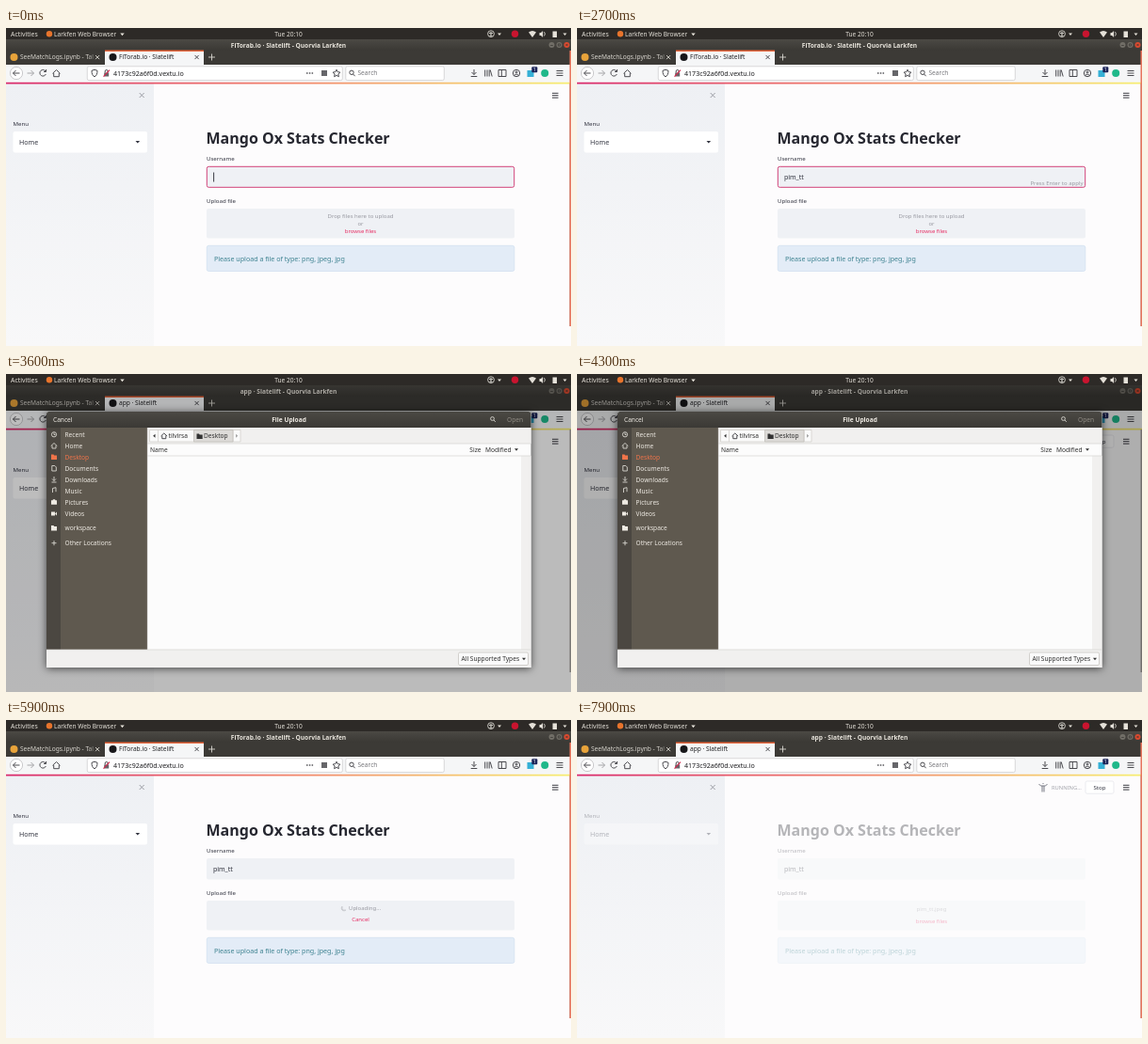
Recreate the animation shown at these times as an HTML page. Size 600 by 338 pixels, loop 8000 ms.

```html
<!DOCTYPE html>
<html lang="en">
<head>
<meta charset="utf-8">
<title>Stats checker upload</title>
<style>
html, body { margin: 0; width: 100%; height: 100%; overflow: hidden; background: #fdfcfd; }
svg { display: block; width: 600px; height: 338px; }
text { font: 6.6px "Noto Sans", "Open Sans", sans-serif; white-space: pre; }
.mid { text-anchor: middle; }
.end { text-anchor: end; }
.bold { font-weight: 700; }
.body { font-size: 7.1px; fill: #31333f; }
.small { font-size: 6.1px; fill: #31333f; }
.hint { font-size: 6px; fill: #9899a1; }
.link { font-size: 6px; fill: #e62c62; }
.line { fill: none; stroke: #4a4a4f; stroke-width: 1; }
.pale { fill: none; stroke: #d9d6d0; stroke-width: .9; }

/* 1% of the loop is 80 ms */
.step, .ease { animation: 8s step-end infinite; }
.ease { animation-timing-function: linear; }
.home { animation-name: home; }
.app { animation-name: app; }
.focus { animation-name: focus; }
.press { animation-name: press; }
.caret { animation-name: caret; }
.hover { animation-name: hover; }
.drop { animation-name: drop; }
.sending { animation-name: sending; }
.sent { animation-name: sent; }
.edge { animation-name: edge; }
.status { animation-name: status; }
.stale { animation-name: stale; }
.dim { animation-name: dim; }
.dialog { animation-name: dialog; transform-origin: 300px 176px; }
.shadow { filter: drop-shadow(0 1px 4px rgba(0, 0, 0, .65)); }
.c1 { animation-name: c1; } .c2 { animation-name: c2; } .c3 { animation-name: c3; }
.c4 { animation-name: c4; } .c5 { animation-name: c5; } .c6 { animation-name: c6; }
.spin { animation: spin .8s linear infinite; transform-origin: 359px 200px; }
.run, .wheel, .stand { animation: 1.6s step-end infinite; }
.run { animation-name: run; }
.wheel { animation-name: wheel; }
.stand { animation-name: stand; }

@keyframes home { 0% { opacity: 1 } 45% { opacity: 0 } 60% { opacity: 1 } 80%, to { opacity: 0 } }
@keyframes app { 0% { opacity: 0 } 45% { opacity: 1 } 60% { opacity: 0 } 80%, to { opacity: 1 } }
@keyframes focus { 0% { opacity: 1 } 39.8%, to { opacity: 0 } }
@keyframes press { 0% { opacity: 0 } 4.8% { opacity: 1 } 39.8%, to { opacity: 0 } }
@keyframes hover { 0% { opacity: 0 } 37.3% { opacity: 1 } 62.2%, to { opacity: 0 } }
@keyframes drop { 0% { opacity: 1 } 62.2%, to { opacity: 0 } }
@keyframes sending { 0% { opacity: 0 } 62.2% { opacity: 1 } 78.6%, to { opacity: 0 } }
@keyframes sent { 0% { opacity: 0 } 78.6%, to { opacity: 1 } }
@keyframes edge { 0% { opacity: 1 } 41.2% { opacity: 0 } 62.2%, to { opacity: 1 } }
@keyframes c1 { 0% { opacity: 0 } 4.8%, to { opacity: 1 } }
@keyframes c2 { 0% { opacity: 0 } 8.6%, to { opacity: 1 } }
@keyframes c3 { 0% { opacity: 0 } 12.3%, to { opacity: 1 } }
@keyframes c4 { 0% { opacity: 0 } 19.8%, to { opacity: 1 } }
@keyframes c5 { 0% { opacity: 0 } 23.6%, to { opacity: 1 } }
@keyframes c6 { 0% { opacity: 0 } 26%, to { opacity: 1 } }
@keyframes caret {
  0% { transform: none; opacity: 1 }
  4.8% { transform: translateX(4.3px) }
  8.6% { transform: translateX(6.1px) }
  12.3% { transform: translateX(12.6px) }
  19.8% { transform: translateX(15.7px) }
  23.6% { transform: translateX(18.2px) }
  26% { transform: translateX(20.7px); opacity: 1 }
  32.3% { transform: translateX(20.7px); opacity: 0 }
  38.5% { transform: translateX(20.7px); opacity: 1 }
  39.8%, to { transform: translateX(20.7px); opacity: 0 }
}
@keyframes dialog {
  0%, 41.42% { transform: scaleY(0); opacity: 0; animation-timing-function: cubic-bezier(.25, .46, .45, .94) }
  44.55%, 62.1% { transform: none; opacity: 1 }
  62.2%, to { transform: none; opacity: 0 }
}
@keyframes dim { 0%, 42.5% { opacity: 0 } 45.5%, 62.1% { opacity: 1 } 62.2%, to { opacity: 0 } }
@keyframes status {
  0%, 46% { opacity: 0 } 48.5%, 59.9% { opacity: 1 }
  60%, 81% { opacity: 0 } 83.5%, to { opacity: 1 }
}
@keyframes stale { 0%, 86.25% { opacity: 1; animation-timing-function: ease-in } 98.7%, to { opacity: .33 } }
@keyframes spin { to { transform: rotate(1turn) } }
@keyframes run { 0%, 50% { opacity: 1 } 25%, 75%, to { opacity: 0 } }
@keyframes wheel { 0% { opacity: 0 } 25% { opacity: 1 } 50%, to { opacity: 0 } }
@keyframes stand { 0% { opacity: 0 } 75%, to { opacity: 1 } }
</style>
</head>
<body>
<svg viewBox="0 0 600 338">
  <defs>
    <linearGradient id="rainbow"><stop stop-color="#d9286a"/><stop offset=".5" stop-color="#f2836a"/><stop offset="1" stop-color="#f6ee70"/></linearGradient>
    <linearGradient id="side" x2="0" y2="1"><stop stop-color="#eef0f4"/><stop offset="1" stop-color="#f8f8f9"/></linearGradient>
    <linearGradient id="bar" x2="0" y2="1"><stop stop-color="#4b4944"/><stop offset="1" stop-color="#3b3935"/></linearGradient>
    <linearGradient id="tabfade"><stop stop-color="#3c3a36" stop-opacity="0"/><stop offset="1" stop-color="#3c3a36"/></linearGradient>
    <clipPath id="tab"><path d="M0 23H100V39H0z"/></clipPath>
  </defs>

  <!-- page -->
  <path fill="#fdfcfd" d="M0 57H600V338H0z"/>
  <path fill="url(#side)" d="M0 58H157V338H0z"/>
  <path fill="url(#rainbow)" d="M0 57.5H600V59.5H0z"/>
  <path class="line" style="stroke:#9b9ca3" d="M141.7 69l5 5m0-5l-5 5"/>

  <g class="ease stale">
    <text class="small" x="7.5" y="104">Menu</text>
    <rect x="7.5" y="110" width="142.5" height="22.5" rx="2" fill="#fff"/>
    <text class="body" x="14" y="123.8">Home</text>
    <path fill="#31333f" d="M137.5 120h4.6l-2.3 2.6z"/>

    <text class="bold" x="212.5" y="122.5" style="font-size:16px;fill:#262730">Mango Ox Stats Checker</text>
    <text class="small" x="213" y="141">Username</text>
    <rect x="213" y="147" width="327" height="22.5" rx="2" fill="#eff1f5"/>
    <rect class="step focus" x="213.3" y="147.3" width="326.4" height="22" rx="2" fill="none" stroke="#d3447a"/>
    <g class="body">
      <text class="body step c1" x="220" y="160.8">p</text>
      <text class="body step c2" x="224.3" y="160.8">i</text>
      <text class="body step c3" x="226.1" y="160.8">m</text>
      <text class="body step c4" x="232.6" y="160.8">_</text>
      <text class="body step c5" x="235.7" y="160.8">t</text>
      <text class="body step c6" x="238.2" y="160.8">t</text>
    </g>
    <path class="step caret" fill="#262730" d="M220.2 153.5h.9v10h-.9z"/>
    <text class="hint end step press" x="537.5" y="167">Press Enter to apply</text>

    <text class="small" x="213" y="186.2">Upload file</text>
    <rect x="213" y="192" width="327" height="31.5" rx="2" fill="#eff1f5"/>
    <g class="step drop">
      <text class="hint mid" x="376.5" y="202.4">Drop files here to upload</text>
      <text class="hint mid" x="376.5" y="210">or</text>
      <text class="link mid" x="376.5" y="217.6">browse files</text>
      <path class="step hover" stroke="#e62c62" stroke-width=".6" d="M360 218.7h33"/>
    </g>
    <g class="step sending">
      <path class="spin" fill="none" stroke="#a0a1a8" stroke-width=".8" d="M359 197.5a2.5 2.5 0 0 1 0 5"/>
      <text class="hint" x="364" y="202.4">Uploading...</text>
      <text class="link mid" x="376.5" y="213.8">Cancel</text>
    </g>
    <g class="step sent">
      <text class="hint mid" x="376.5" y="203.2">pim_tt.jpeg</text>
      <text class="link mid" x="376.5" y="215.6">browse files</text>
    </g>
    <rect x="213.3" y="231.3" width="326.5" height="27.2" rx="2" fill="#e3ecf7" stroke="#cfdff0" stroke-width=".7"/>
    <text class="body" x="221" y="247.6" style="fill:#3d8290">Please upload a file of type: png, jpeg, jpg</text>
  </g>

  <g class="ease status">
    <g fill="none" stroke="#777983">
      <path class="run" d="M495.5 68v.8M495 70l-1 3 2.5 1.5V77M494 73l-3 3M491 71.5l4-1.5 3 2.5"/>
      <path class="wheel" d="M494 67v1M494 69v4h3l1.5 3M494 70.5h3M492.5 71.5a2.6 2.6 0 1 0 4 3.4"/>
      <path class="stand" d="M495 67v1M490.5 68l2 2h5l2-2M494 70v6.5M496 70v6.5"/>
    </g>
    <text x="504" y="74.3" style="font-size:5.8px;fill:#a3a4ab">RUNNING...</text>
    <rect x="540" y="65" width="30" height="13.2" rx="1.8" fill="#fff" stroke="#e2e3e8" stroke-width=".7"/>
    <text class="small mid" x="555" y="73.8">Stop</text>
  </g>
  <path class="line" style="stroke:#3a3b42" d="M580 69.3h6.5m-6.5 2.4h6.5m-6.5 2.4h6.5"/>

  <!-- window frame and tabs -->
  <path fill="#3c3a36" d="M0 12H600V39H0z"/>
  <path fill="url(#bar)" d="M0 12H600V23.5H0z"/>
  <g fill="#e6e2da">
    <text class="mid bold step home" x="300" y="20.6">FiTorab.io · Slatelift - Quorvia Larkfen</text>
    <text class="mid bold step app" x="300" y="20.6">app · Slatelift - Quorvia Larkfen</text>
  </g>
  <g fill="#716e67"><circle cx="579.5" cy="18" r="3"/><circle cx="587.5" cy="18" r="3"/></g>
  <circle cx="595.5" cy="18" r="3" fill="#dc4a30"/>
  <path stroke="#33312d" stroke-width=".7" fill="none" d="M578.2 18.5h2.6M586.4 16.9h2.2v2.2h-2.2zM594.4 16.9l2.2 2.2m0-2.2l-2.2 2.2"/>
  <circle cx="8.5" cy="31" r="4" fill="#e8a33a"/>
  <g clip-path="url(#tab)">
    <text x="15" y="33.4" fill="#d8d5ce">SeeMatchLogs.ipynb - Tal</text>
    <path fill="url(#tabfade)" d="M86 25h14v14H86z"/>
  </g>
  <path class="pale" d="M95 29l4.2 4.2m0-4.2L95 33.2"/>
  <path fill="#f5f6f7" d="M105 24H210V39H105z"/>
  <path fill="#e8663c" d="M105 23.4H210V25H105z"/>
  <circle cx="113.5" cy="31" r="4" fill="#17171a"/>
  <g fill="#1f1f22">
    <text class="step home" x="120" y="33.4">FiTorab.io · Slatelift</text>
    <text class="step app" x="120" y="33.4">app · Slatelift</text>
  </g>
  <path class="line" d="M200.5 28.9l4.2 4.2m0-4.2l-4.2 4.2"/>
  <path class="pale" d="M215 31h7m-3.5-3.5v7"/>

  <!-- toolbar -->
  <path fill="#f5f6f7" d="M0 39H600V57.5H0z"/>
  <circle cx="11" cy="48" r="6.6" fill="#fff" stroke="#b5b5b8" stroke-width=".7"/>
  <g class="line">
    <path d="M14.5 48h-7m3-3l-3 3 3 3"/>
    <path stroke="#a5a5a8" d="M22.5 48h7m-3-3l3 3-3 3"/>
    <path d="M42 46a3.3 3.3 0 1 0 .3 3M42.6 44v2.5h-2.5"/>
    <path d="M49.5 48.3l4-3.8 4 3.8M50.7 48v3.7h5.6V48"/>
  </g>
  <g fill="#fff" stroke="#c9c9cc" stroke-width=".7">
    <rect x="86.3" y="40.8" width="271" height="14.8" rx="1.8"/>
    <rect x="360.8" y="40.8" width="104.5" height="14.8" rx="1.8"/>
  </g>
  <path class="line" d="M94 44.3l3 1c0 3.5-1 5.5-3 6.5-2-1-3-3-3-6.5z"/>
  <path fill="#66666a" d="M104.2 47.5h5v4h-5z"/>
  <path class="line" d="M105.2 47.5v-1.5a1.5 1.5 0 0 1 3 0v1.5"/>
  <path stroke="#d7264c" stroke-width="1.1" d="M103.5 51.7l6.5-7"/>
  <text x="114" y="50.5" fill="#1a1a1d" style="font-size:7.1px">4173c92a6f0d.vextu.io</text>
  <path stroke="#55555a" stroke-width="1.5" stroke-dasharray="1.5 1.3" d="M319 48h7.5"/>
  <rect x="335" y="45" width="6" height="6" fill="#66666a"/>
  <path class="line" d="M351 44.2l1.2 2.5 2.7.4-2 1.9.5 2.7-2.4-1.3-2.4 1.3.5-2.7-2-1.9 2.7-.4z"/>
  <g class="line"><circle cx="367" cy="47.3" r="2.2"/><path d="M368.6 49l2 2.2"/></g>
  <text x="373.5" y="50.4" fill="#77777b">Search</text>
  <g class="line">
    <path d="M497 44v5.5m-2.5-2.5l2.5 2.5 2.5-2.5M493.7 51.5h6.6"/>
    <path d="M508.7 44.5v7m2.3-7v7m2.2-7v7m1-7l2 7"/>
    <path d="M523 44.5h8v7h-8zM526.3 44.5v7"/>
    <circle cx="542" cy="48" r="3.7"/><path d="M539.5 50.8c1-2 4-2 5 0M541 47a1 1 0 1 0 2 0a1 1 0 1 0-2 0"/>
    <path d="M584.5 45.5h7m-7 2.5h7m-7 2.5h7"/>
  </g>
  <rect x="553.5" y="45" width="7" height="7" fill="#35b0d6"/>
  <rect x="558.3" y="41.3" width="6" height="6" rx="1" fill="#1c2459"/>
  <text class="mid" x="561.3" y="46.1" fill="#fff" style="font-size:5px">1</text>
  <circle cx="572.2" cy="48" r="4" fill="#1fb88a"/>
  <path fill="#a39f9c" d="M598.5 59H600V317H598.5z"/>
  <path class="step edge" fill="#e8745c" d="M598.5 24H600V317H598.5z"/>

  <path class="ease dim" fill="#000" fill-opacity=".31" d="M0 12H600V338H0z"/>

  <!-- desktop panel -->
  <path fill="#2d2a27" d="M0 0H600V12H0z"/>
  <g fill="#e4e0d8">
    <text x="5" y="8.9" style="font-size:6.9px">Activities</text>
    <text x="51" y="8.9">Larkfen Web Browser</text>
    <text class="mid" x="300" y="8.9">Tue 20:10</text>
    <path d="M121.3 5.5h4.4l-2.2 2.7zM522 5.5h4l-2 2.5zM591.5 5.5h4l-2 2.5z"/>
    <path d="M555 4.5q4-3 8 0l-4 5.5zM566.5 5h1.6l2-2v7l-2-2h-1.6zM580.5 3.5h4.5v6.5h-4.5z"/>
  </g>
  <circle cx="46" cy="6.2" r="3.2" fill="#e8742c"/>
  <g class="pale"><circle cx="515" cy="6.2" r="3.4"/><path d="M515 4v3m-2-1.5h4M515 7l-1.2 2m1.2-2l1.2 2M571.5 4.2q1.8 2 0 4.2"/></g>
  <circle cx="540.5" cy="6.3" r="3.7" fill="#c9142f"/>

  <!-- file dialog -->
  <g class="ease dialog">
    <path class="shadow" fill="#fcfcfc" d="M43 312V42.5q0-2.5 2.5-2.5H555q2.5 0 2.5 2.5V312z"/>
    <path fill="url(#bar)" d="M43 57V42.5q0-2.5 2.5-2.5H555q2.5 0 2.5 2.5V57z"/>
    <path fill="#5f594f" d="M43 57H150V293H43z"/>
    <path fill="#4b4741" d="M43 57H58V293H43z"/>
    <path fill="#f1f0ef" d="M150 57H557.5V74H150zM43 293H557.5V312H43zM547 87H557.5V293H547z"/>
    <path stroke="#d5d3d0" stroke-width=".7" d="M150.3 57V293M150 74H557.5M150 87H557.5M43 293H557.5"/>
    <g fill="#eeeae3">
      <text x="50" y="50.5">Cancel</text>
      <text class="bold mid" x="300.5" y="50.5">File Upload</text>
      <text class="end" x="549" y="50.5" fill="#918d85">Open</text>
      <text x="62.5" y="66.6">Recent</text>
      <text x="62.5" y="78.6">Home</text>
      <text x="62.5" y="90.7" fill="#f0744a">Desktop</text>
      <text x="62.5" y="102.7">Documents</text>
      <text x="62.5" y="114.8">Downloads</text>
      <text x="62.5" y="126.8">Music</text>
      <text x="62.5" y="138.8">Pictures</text>
      <text x="62.5" y="150.9">Videos</text>
      <text x="62.5" y="166.3">workspace</text>
      <text x="62.5" y="182">Other Locations</text>
      <path d="M48 134.3h1.5l.5-1h2l.5 1H54v4.5h-6zM48 146.5h4v4h-4zM52 148.5l2-2v4zM48 161h2.5l.7 1H54v4.5h-6z"/>
      <path fill="#f0744a" d="M48 85.5h2.5l.7 1H54V91h-6z"/>
    </g>
    <g class="pale">
      <circle cx="516.5" cy="47.5" r="1.9"/><path d="M518 49l1.8 1.9"/>
      <circle cx="51" cy="64.3" r="2.6"/><path d="M51 62.5v2h1.5M47.7 76.5L51 73.5l3.3 3M49 76v3h4v-3M48.8 97.5h3l1.5 1.5v4h-4.5zM51 109v4.5m-2-2l2 2 2-2M48.5 115h5M49.5 126v-4.5l3.5-.8v4.5M48.5 179.7h5m-2.5-2.5v5"/>
    </g>
    <path fill="#fafafa" stroke="#cfccc8" stroke-width=".7" d="M152.5 59.5h96.5v12.5h-96.5zM161.5 59.5v12.5M241 59.5v12.5"/>
    <path fill="#dddbd8" stroke="#bdbab5" stroke-width=".7" d="M199.5 59.5H241v12.5h-41.5z"/>
    <path fill="#333" d="M158.5 63.8v4l-2.3-2zM202.5 63.5h2.5l.7 1h3V69h-6.2zM540 79.3h4l-2 2.5z"/>
    <path fill="#a5a5a5" d="M244 63.8v4l2.3-2z"/>
    <path class="line" d="M164.5 66l3.3-3 3.3 3M165.8 65.5v3.2h4v-3.2"/>
    <g fill="#2e2e2e">
      <text x="172.5" y="68.3">tilvirsa</text>
      <text x="210" y="68.3">Desktop</text>
      <text x="153" y="83">Name</text>
      <text class="end" x="504.5" y="83">Size</text>
      <text x="509" y="83">Modified</text>
    </g>
    <rect x="480.5" y="296" width="74" height="13.5" rx="1.5" fill="#fafafa" stroke="#c3c0bc" stroke-width=".7"/>
    <text x="483.5" y="305.2" fill="#2e2e2e">All Supported Types</text>
    <path fill="#333" d="M548 301.7h4l-2 2.5z"/>
  </g>
</svg>
</body>
</html>
```
